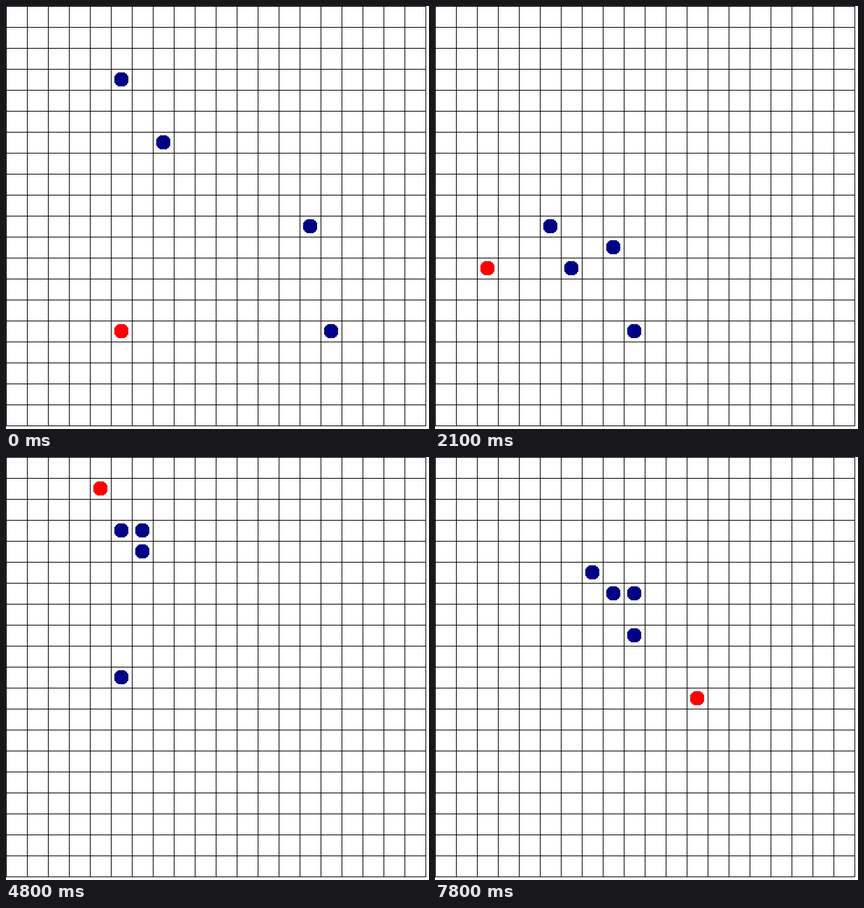
A matplotlib script for the animation above (8 s loop, 605x605 px).

```python
import matplotlib.pyplot as plt
from matplotlib.animation import FuncAnimation
from matplotlib.patches import Circle, Rectangle

STAGE = 605
CELL = 30
CELLS = 20
RADIUS = 10
TICK_MS = 100
TICKS_PER_MOVE = 3
TICKS = 80

MOVES = {"L": (-1, 0), "R": (1, 0), "U": (0, -1), "D": (0, 1), "-": (0, 0)}

# Start cell and one move per step for each hunter.
HUNTERS = [
    ((5, 3), "DDDDD DDUUR UUUU LUULR UDRR DDD"),
    ((7, 6), "DDDDD DLUUU UUUU UUULR RRRD DDD"),
    ((14, 10), "LDLLL LLLUU LUUU UUUUL RRRD DDD"),
    ((15, 15), "LL-LL LLLLL UUUL UUUUU RURR RDD"),
]

# The runner circles the board clockwise, up to two cells at a time.
RUNNER = [
    (5, 15), (5, 16), (5, 18), (4, 18), (3, 17), (2, 16), (2, 14),
    (2, 12), (1, 11), (1, 9), (2, 7), (2, 5), (2, 4), (2, 2),
    (2, 1), (3, 1), (4, 1), (6, 1), (8, 1), (9, 1), (10, 1),
    (11, 3), (12, 5), (13, 7), (13, 9), (12, 10), (12, 11),
]


def walk(start, moves):
    """List the cells visited from start, including start."""
    cells = [start]
    for move in moves.replace(" ", ""):
        dx, dy = MOVES[move]
        x, y = cells[-1]
        cells.append((x + dx, y + dy))
    return cells


def cell_center(cell):
    return tuple(CELL * c + CELL / 2 for c in cell)


fig = plt.figure(figsize=(5, 5), dpi=STAGE / 5, facecolor="white")
ax = fig.add_axes([0, 0, 1, 1])
ax.set_xlim(0, STAGE)
ax.set_ylim(STAGE, 0)
ax.axis("off")


def fill(patch, color, zorder):
    patch.set(facecolor=color, linewidth=0, antialiased=False, zorder=zorder)
    return ax.add_patch(patch)


board = CELL * CELLS + 1
for k in range(0, board, CELL):
    fill(Rectangle((k, 0), 1, board), "black", 1)
    fill(Rectangle((0, k), board, 1), "black", 1)

paths = [walk(*hunter) for hunter in HUNTERS] + [RUNNER]
colors = ["#000084"] * len(HUNTERS) + ["#ff0000"]
dots = [fill(Circle(cell_center(path[0]), RADIUS), color, 2)
        for path, color in zip(paths, colors)]


def update(tick):
    step = tick // TICKS_PER_MOVE
    for dot, path in zip(dots, paths):
        dot.center = cell_center(path[step])
    return dots


anim = FuncAnimation(fig, update, frames=TICKS, interval=TICK_MS,
                     init_func=lambda: update(0), repeat=True,
                     repeat_delay=0, blit=False)
plt.show()
```
